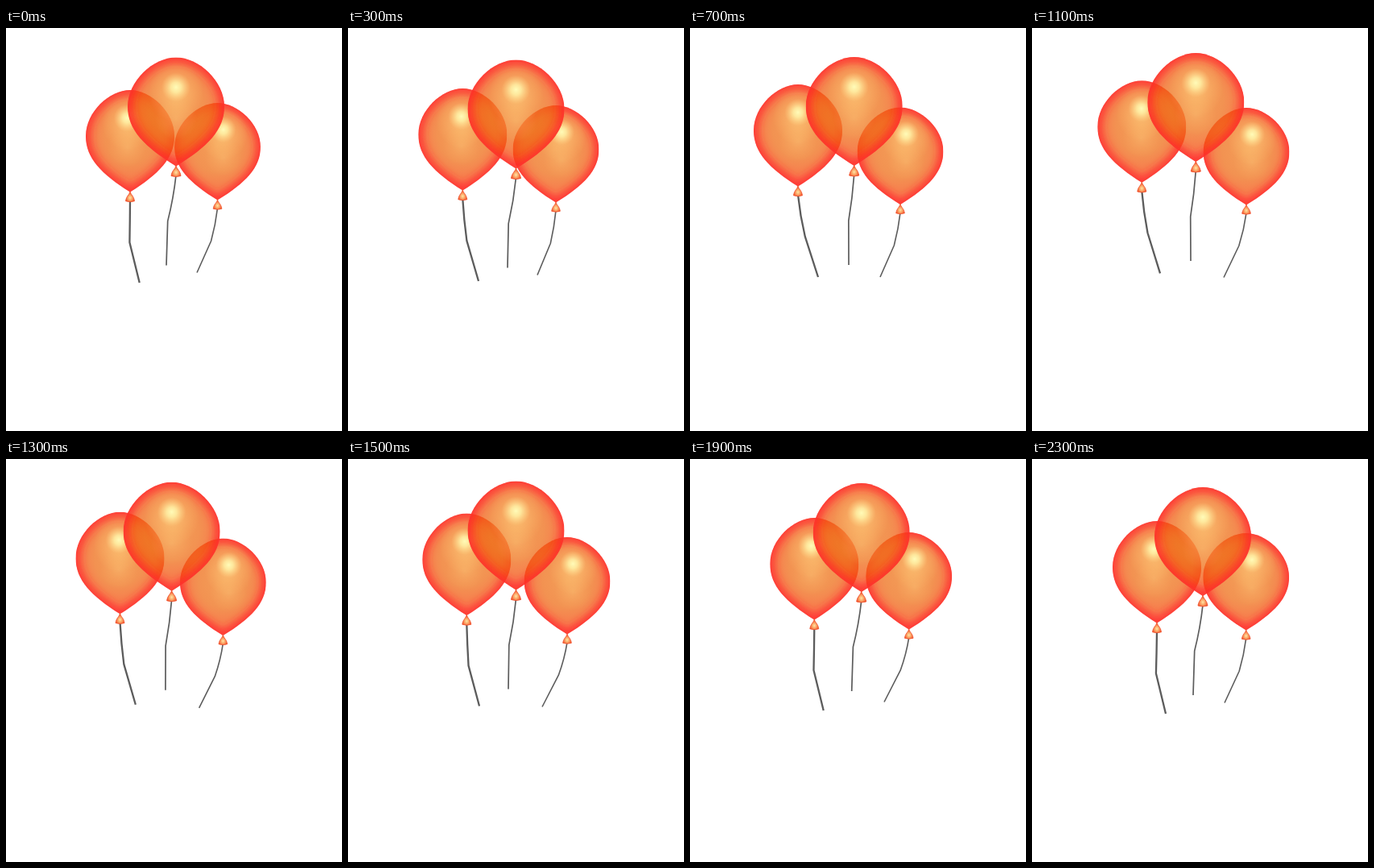
Recreate the animation shown at these times as an HTML page. Size 417 by 500 pixels, loop 2400 ms.

```html
<!DOCTYPE html>
<html lang="en">
<head>
<meta charset="utf-8">
<title>Balloons</title>
<style>
  html, body { margin: 0; width: 100%; height: 100%; overflow: hidden; background: #fff; }
  svg { display: block; width: 100%; height: 100%; }
</style>
</head>
<body>
<svg viewBox="0 0 417 500">
  <defs>
    <path id="skin" d="M0 0C28 0 60 29 60 61C60 90 39 111 0 135C-39 111 -60 90 -60 61C-60 29 -28 0 0 0Z"/>
    <clipPath id="inside"><use href="#skin"/></clipPath>
    <filter id="soft" filterUnits="userSpaceOnUse" x="-80" y="-20" width="160" height="175">
      <feGaussianBlur stdDeviation="5"/>
    </filter>
    <radialGradient id="body" gradientUnits="userSpaceOnUse" cx="0" cy="0" r="68" gradientTransform="translate(0 60) scale(1 1.08)">
      <stop offset="0" stop-color="#f08226" stop-opacity=".77"/>
      <stop offset=".5" stop-color="#ee6e18" stop-opacity=".75"/>
      <stop offset=".8" stop-color="#f4500f" stop-opacity=".74"/>
      <stop offset="1" stop-color="#fb3a12" stop-opacity=".74"/>
    </radialGradient>
    <radialGradient id="sheen">
      <stop offset="0" stop-color="#ffd080" stop-opacity=".7"/>
      <stop offset="1" stop-color="#ffc070" stop-opacity="0"/>
    </radialGradient>
    <radialGradient id="glint">
      <stop offset="0" stop-color="#fffbb8"/>
      <stop offset=".35" stop-color="#fff3a8" stop-opacity=".8"/>
      <stop offset="1" stop-color="#ffd488" stop-opacity="0"/>
    </radialGradient>
    <radialGradient id="knotFill" cx=".5" cy=".62" r=".5">
      <stop offset="0" stop-color="#ffe6a4"/>
      <stop offset=".5" stop-color="#fba264"/>
      <stop offset="1" stop-color="#f4582f"/>
    </radialGradient>
    <g id="shell" clip-path="url(#inside)">
      <use href="#skin" fill="url(#body)"/>
      <use href="#skin" fill="none" stroke="#ff2a2e" stroke-opacity=".75" stroke-width="13" filter="url(#soft)"/>
      <use href="#skin" fill="none" stroke="#ff3a36" stroke-opacity=".3" stroke-width="4"/>
    </g>
    <g id="shine">
      <ellipse cy="44" rx="34" ry="36" fill="url(#sheen)"/>
      <ellipse cy="76" rx="26" ry="26" fill="url(#sheen)" opacity=".45"/>
      <ellipse cy="37" rx="18" ry="18" fill="url(#glint)"/>
    </g>
    <path id="knot" d="M0 -1C1 4 5 5 6 12Q0 14 -6 12C-5 5 -1 4 0 -1Z" fill="url(#knotFill)" stroke="#f0502c" stroke-width=".9"/>
  </defs>
  <g id="strings" fill="none" stroke="#5c5c5c" stroke-linejoin="round"></g>
  <g id="balloons"></g>
</svg>
<script>
const LOOP = 2400, STEP = 100;
const keyTimes = [0, 300, 700, 1100, 1500, 1900, 2300];

// x: tip, top: crown, tail: string end; bend: [slope, offset] of the string's middle
const balloons = [
  { x: [154, 142.3, 134, 136.3, 147.3, 154.3, 155], top: [77, 75, 70, 65.3, 67.5, 73, 77],
    tail: [165.7, 162, 159, 159, 163, 165.7, 166], drop: 239, bend: [.71, -8.9],
    sx: .917, sy: .937, line: 2.3, glint: x => (134 - x) / 5 },
  { x: [262.5, 258, 261, 266, 272, 271.7, 265.7], top: [93, 96, 98.5, 99, 97, 91, 92],
    tail: [237, 235, 236, 238, 241, 241, 239], drop: 210.5, bend: [.5, 4.8],
    sx: .89, sy: .893, line: 1.6, glint: () => 8 },
  { x: [211, 208.5, 203.7, 203.3, 208.5, 212.7, 212], top: [36.5, 39.5, 36, 31, 27.5, 30, 35],
    tail: [199, 198, 197, 197, 199, 200.7, 200], drop: 258, bend: [.65, -2.5],
    sx: 1, sy: 1, line: 1.7, glint: () => 0 }
];

function add(parent, tag, attrs = {}) {
  const node = document.createElementNS('http://www.w3.org/2000/svg', tag);
  for (const name in attrs) node.setAttribute(name, attrs[name]);
  return parent.appendChild(node);
}

// Smooth periodic curve through unevenly spaced keys
function sample(values, t) {
  const n = values.length;
  const value = i => values[(i + n) % n];
  const time = i => keyTimes[(i + n) % n] + Math.floor(i / n) * LOOP;
  const slope = i => (value(i + 1) - value(i - 1)) / (time(i + 1) - time(i - 1));
  let i = n - 1;
  while (keyTimes[i] > t) i--;
  const span = time(i + 1) - time(i), u = (t - time(i)) / span, v = 1 - u;
  return v * v * ((1 + 2 * u) * value(i) + u * span * slope(i)) +
         u * u * ((3 - 2 * u) * value(i + 1) - v * span * slope(i + 1));
}

for (const b of balloons) {
  b.string = add(document.getElementById('strings'), 'path', { 'stroke-width': b.line });
  b.group = add(document.getElementById('balloons'), 'g');
  add(b.group, 'use', { href: '#shell' });
  b.shine = add(b.group, 'use', { href: '#shine' });
  add(b.group, 'use', { href: '#knot', transform: 'translate(0 135)' });
}

function stringPath(x, y, midX, endX, endY) {
  const midY = y + (endY - y) * .51;
  return `M${x} ${y}Q${x * .7 + midX * .3} ${(y + midY) / 2} ${midX} ${midY}L${endX} ${endY}`;
}

function draw(t) {
  for (const b of balloons) {
    const x = sample(b.x, t), top = sample(b.top, t), tail = sample(b.tail, t);
    const midX = x + b.bend[0] * (tail - x) + b.bend[1];
    b.group.setAttribute('transform', `translate(${x} ${top}) scale(${b.sx} ${b.sy})`);
    b.shine.setAttribute('transform', `translate(${b.glint(x)} 0)`);
    b.string.setAttribute('d', stringPath(x, top + 146 * b.sy, midX, tail, top + b.drop));
  }
}

const start = performance.now();
function tick() {
  const t = (performance.now() - start) % LOOP;
  draw(Math.floor(t / STEP) * STEP);
  requestAnimationFrame(tick);
}
tick();
</script>
</body>
</html>
```
